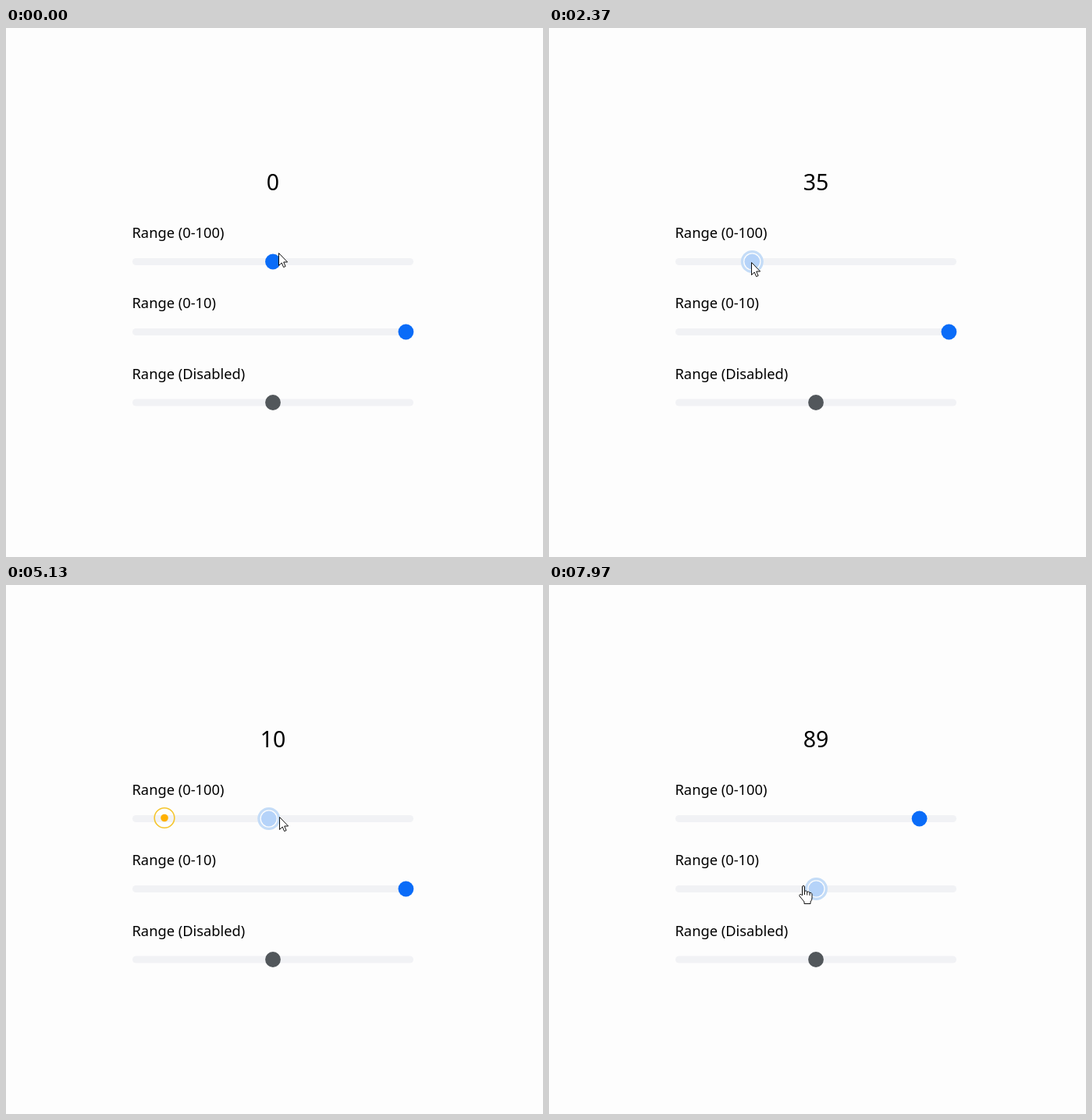
Recreate the animation shown at these times as an HTML page with a canvas. Size 688 px wide and 678 px high, loop 8 s.

```html
<!DOCTYPE html>
<html lang="en">
<head>
<meta charset="utf-8">
<title>Range sliders</title>
<style>
  html, body { margin: 0; width: 100%; height: 100%; overflow: hidden; background: #fdfdfd; }
  canvas { display: block; }
</style>
</head>
<body>
<canvas id="stage" width="688" height="678"></canvas>
<script>
const ctx = document.getElementById("stage").getContext("2d");
const LOOP = 8000, LAG = 320;
const PRESS = 700, LAST_DRAG = 4870, RELEASE = 5400, SECOND_PRESS = 7000, HAND = 7970;
const BACK = "#fdfdfd", TRACK = "#f1f2f5", GREY = "#52575b";
const BLUE = "#0a6cf8", PALE = "#b5d3f9", HALO = "#c4dcf7";
const FONT = '"Noto Sans", "Open Sans", sans-serif';

const clamp = (v, a = 0, b = 1) => Math.min(b, Math.max(a, v));
const between = (t, a, b) => t >= a && t < b;

// Eased progress from 0 at time a to 1 at time b.
function ease(t, a, b) {
  const u = clamp((t - a) / (b - a));
  return u * u * (3 - 2 * u);
}

// Four drags of the first slider: left, left, slowly left, then far right.
const thumbX = t => 342
  - 48 * ease(t, PRESS, 1240)
  - 52.2 * ease(t, 1970, 2640)
  - 36.8 * ease(t, 2840, 4080)
  + 269.6 * ease(t, LAST_DRAG, RELEASE);

// The pointer holds the thumb, overshoots the last drag, then works the second slider.
const pointerX = t => thumbX(t) + 7
  - 8 * ease(t, 0, 300)
  + 19 * ease(t, LAST_DRAG, 5250)
  + 18.5 * ease(t, 6300, 6900)
  - 171 * ease(t, 7130, 7930);

const pointerY = t => 288
  + 12 * ease(t, 0, 300)
  - 3 * ease(t, LAST_DRAG, 5130)
  + 88 * ease(t, 6300, 6900);

function disc(x, y, r, fill) {
  ctx.beginPath();
  ctx.arc(x, y, r, 0, 7);
  ctx.fillStyle = fill;
  ctx.fill();
}

function text(s, x, y, size, align) {
  ctx.font = `${size}px ${FONT}`;
  ctx.textAlign = align;
  ctx.fillStyle = "#000";
  ctx.fillText(s, x, y);
}

function slider(label, y, x, color, focused) {
  text(label, 161.5, y - 30.5, 18.3, "left");
  ctx.fillStyle = TRACK;
  ctx.beginPath();
  ctx.roundRect(162, y - 4.5, 360, 9, 4.5);
  ctx.fill();
  if (focused) {
    disc(x, y, 14.5, HALO);
    disc(x, y, 11.2, BACK);
  }
  disc(x, y, 9.9, color);
}

function marker(x, y, alpha) {
  ctx.globalAlpha = alpha;
  disc(x, y, 4.8, "#ffb000");
  ctx.beginPath();
  ctx.arc(x, y, 12.8, 0, 7);
  ctx.strokeStyle = "#f5c52c";
  ctx.lineWidth = 1.6;
  ctx.stroke();
  ctx.globalAlpha = 1;
}

const arrow = new Path2D("M.5 .5V16.5L4.2 13L6.6 18.6L9.1 17.5L6.7 12H11.6Z");
const hand = new Path2D("M4.5 13V2Q4.5 .5 6 .5T7.5 2V8Q8 6.5 9.5 7T10.7 9Q11.5 7.5 12.8 8T14 10" +
  "Q15 8.8 16 9.6T17 12V16Q17 19 15 21V23.5H7V21L1.2 14Q.3 12.3 1.6 11.5T4.5 13Z" +
  "M7.5 8V12M10.7 9V12.5M14 10V13");

function pointer(path, x, y) {
  ctx.save();
  ctx.translate(Math.round(x), Math.round(y));
  ctx.fillStyle = "#fff";
  ctx.fill(path);
  ctx.strokeStyle = "#111";
  ctx.lineWidth = 1;
  ctx.stroke(path);
  ctx.restore();
}

function draw(t) {
  ctx.fillStyle = BACK;
  ctx.fillRect(0, 0, 688, 678);

  const px = pointerX(t), py = pointerY(t);
  const late = t - LAG;
  const count = late < PRESS ? 0 : Math.round((thumbX(late) - 172) / 3.4);
  const second = t >= SECOND_PRESS;
  const step = second ? clamp(Math.round((px - 172) / 34), 0, 10) : 10;
  const held = between(t, PRESS, 1530) || between(t, 1970, RELEASE + 300);

  text(count, 342, 208, 28.5, "center");
  slider("Range (0-100)", 299.5, thumbX(t), held ? PALE : BLUE, t >= PRESS && !second);
  slider("Range (0-10)", 389.5, 172.4 + 34 * step, second ? PALE : BLUE, second);
  slider("Range (Disabled)", 480, 342, GREY, false);

  // The click marker trails the thumb and stays behind on the last drag.
  const alpha = clamp((t - 2870) / 200) * clamp((5970 - t) / 270);
  if (alpha) marker(thumbX(Math.min(late, LAST_DRAG)) - 2, 298.5, alpha);

  if (t >= HAND) pointer(hand, px - 20, py);
  else pointer(arrow, px, py);
}

function tick() {
  draw(performance.now() % LOOP);
  requestAnimationFrame(tick);
}
tick();
</script>
</body>
</html>
```
